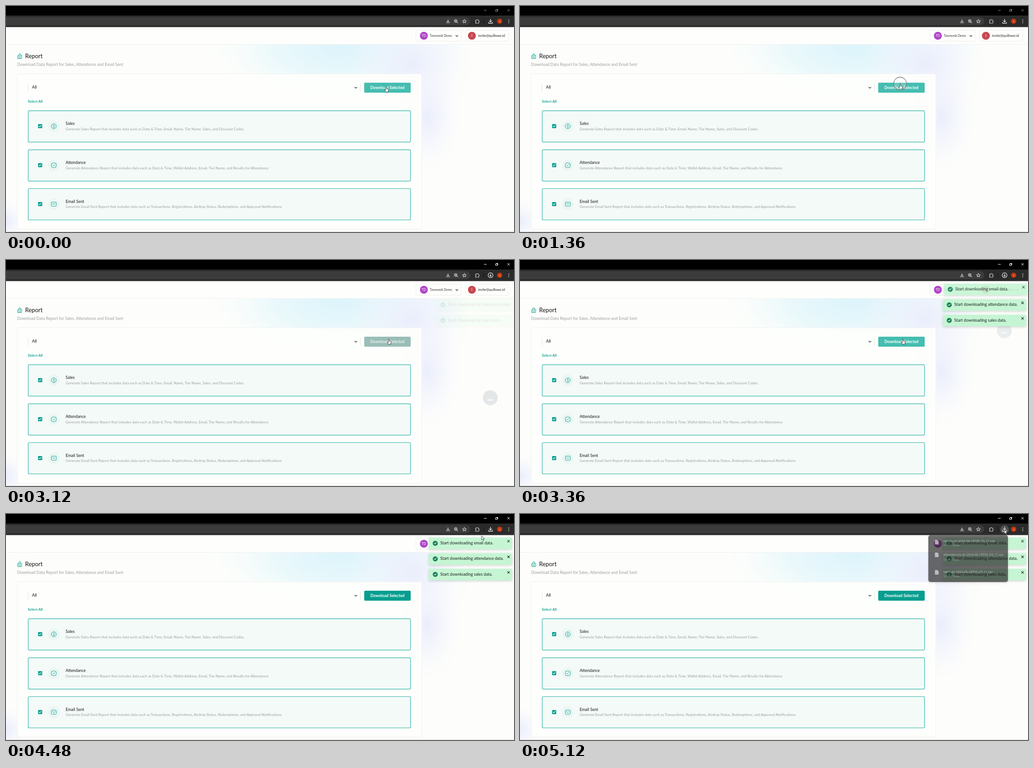
Recreate the animation shown at these times as an HTML page. Size 1116 by 498 pixels, loop 5200 ms.

```html
<!DOCTYPE html>
<html lang="en">
<head>
<meta charset="utf-8">
<title>Report download</title>
<style>
html, body { margin: 0; width: 100%; height: 100%; overflow: hidden; background: #fdfefb; }
svg { display: block; width: 1116px; height: 498px; font-family: Lato, "Open Sans", sans-serif; }
.line { fill: none; stroke-linecap: round; stroke-linejoin: round; }
.bar { stroke: #d2d2d2; stroke-width: 1.1; }
.teal { stroke: #12a394; stroke-width: 1; }
.muted { fill: #9b9da1; }
.mid { text-anchor: middle; }
.bold { font-weight: 700; }

.anim, .cursor, .cursor > * { animation: 5200ms linear infinite; }

.controls { animation-name: controls; }
@keyframes controls { 0%, 36.5% { opacity: .55; } 37.5%, 100% { opacity: 1; } }

.button { animation-name: button; }
@keyframes button {
  0%, 28% { fill: #45bdb0; }
  30%, 57.7% { fill: #8fcec7; }
  60% { fill: #9bbdb7; }
  62.5%, 75.5% { fill: #45bdb0; }
  80%, 100% { fill: #079e8f; }
}
.caption { animation-name: caption; }
@keyframes caption {
  0%, 28%, 62.5%, 100% { fill-opacity: 1; }
  30%, 60% { fill-opacity: .8; }
}

.cursor { animation-name: travel; }
@keyframes travel {
  0% { transform: translate(835px, 178px); }
  18%, 27% { transform: translate(835px, 171.5px); }
  40%, 50% { transform: translate(837px, 177px); }
  60%, 67% { transform: translate(841px, 174px); animation-timing-function: ease-in; }
  75.4% { transform: translate(890px, 158px); }
  87.5%, 100% { transform: translate(1064px, 34.5px); }
}
.cursor > .hand { animation-name: hand; animation-timing-function: step-end; }
.cursor > .ban { animation-name: ban; animation-timing-function: step-end; }
.cursor > .arrow { animation-name: arrow; animation-timing-function: step-end; }
@keyframes hand { 0% { opacity: 1; } 29.2% { opacity: 0; } 58.4% { opacity: 1; } 74.5%, 100% { opacity: 0; } }
@keyframes ban { 0% { opacity: 0; } 29.2% { opacity: 1; } 58.4%, 100% { opacity: 0; } }
@keyframes arrow { 0% { opacity: 0; } 74.5%, 100% { opacity: 1; } }

.ring { animation-name: ring; transform-origin: 835px 171px; }
@keyframes ring {
  0%, 23% { opacity: 0; transform: scale(.3); }
  26.1% { opacity: 1; transform: scale(1); }
  28.5%, 100% { opacity: 0; transform: scale(1.2); }
}

.tray { animation-name: tray; }
.progress { animation-name: progress; }
.badge { animation-name: badge; }
.hover { animation-name: hover; }
.tray, .progress, .badge { animation-timing-function: step-end !important; }
@keyframes tray { 0% { opacity: 1; } 57% { opacity: 0; } 86%, 100% { opacity: 1; } }
@keyframes progress { 0% { opacity: 0; } 57% { opacity: 1; } 86%, 100% { opacity: 0; } }
@keyframes badge { 0% { opacity: 0; } 67.7% { opacity: 1; } 86%, 100% { opacity: 0; } }
@keyframes hover { 0%, 87% { opacity: 0; } 89%, 100% { opacity: 1; } }

.fly { animation-name: fly; }
@keyframes fly {
  0%, 57% { opacity: 0; transform: translate(1064px, 400px); }
  60% { opacity: .9; transform: translate(1064px, 304px); }
  66% { opacity: .6; transform: translate(1064px, 112px); }
  68.4%, 100% { opacity: 0; transform: translate(1064px, 34px); }
}

.toast { animation-name: toast; }
.toast.late { animation-name: toastLate; }
@keyframes toast {
  0%, 59.2% { opacity: 0; transform: translateX(24px); }
  60% { opacity: .12; transform: translateX(17px); }
  63.5%, 100% { opacity: 1; transform: none; }
}
@keyframes toastLate {
  0%, 61% { opacity: 0; transform: translateX(24px); }
  65%, 100% { opacity: 1; transform: none; }
}

.popup { animation-name: popup; }
@keyframes popup { 0%, 89.2% { opacity: 0; } 91.5%, 100% { opacity: 1; } }
.files { font-family: "Open Sans", "Noto Sans", sans-serif; animation-name: files; }
@keyframes files { 0%, 92.4% { opacity: .9; } 98%, 100% { opacity: .62; } }
</style>
</head>
<body>
<svg viewBox="0 0 1116 498">
  <defs>
    <radialGradient id="cyan"><stop offset="0" stop-color="#dcf4fb"/><stop offset=".5" stop-color="#e6f7fb" stop-opacity=".85"/><stop offset="1" stop-color="#f2fbfb" stop-opacity="0"/></radialGradient>
    <radialGradient id="lilac"><stop offset="0" stop-color="#eaedfc"/><stop offset="1" stop-color="#f4f5fd" stop-opacity="0"/></radialGradient>
    <filter id="shadow" x="-10%" y="-30%" width="120%" height="180%"><feDropShadow dx="0" dy="2" stdDeviation="2.5" flood-color="#000" flood-opacity=".16"/></filter>
    <path id="chevron" class="line" d="M-2.3-1.2 0 1.2 2.3-1.2" stroke="#222" stroke-width="1.2"/>
    <path id="cross" class="line" d="M-2.2-2.2 2.2 2.2M2.2-2.2-2.2 2.2"/>
    <path id="tick" class="line" d="M-2.2 0-.7 1.6 2.3-1.6"/>
    <path id="page" fill="#f1f1f1" d="M-4-5H1.5L4-2.5V5H-4Z"/>
    <g id="row">
      <rect x="48.7" y=".7" width="840" height="69" rx="2.5" fill="#f4faf7" stroke="#4dbfb3" stroke-width="1.4"/>
      <rect x="70.5" y="30.3" width="9" height="9" rx="1" fill="#079e8f"/>
      <use href="#tick" x="75" y="34.8" stroke="#fff" stroke-width="1.2"/>
      <circle cx="105" cy="35" r="12.5" fill="#eaf6f3"/>
    </g>
  </defs>

  <!-- page -->
  <rect width="1116" height="498" fill="#fdfefb"/>
  <ellipse cx="735" cy="92" rx="285" ry="125" fill="url(#cyan)"/>
  <ellipse cx="890" cy="130" rx="135" ry="125" fill="url(#lilac)"/>
  <ellipse cx="925" cy="245" rx="75" ry="120" fill="url(#lilac)"/>
  <ellipse cx="0" cy="475" rx="50" ry="50" fill="url(#lilac)"/>
  <rect y="46" width="1116" height="38.5" fill="#fefffd"/>
  <path d="M0 84.5H1116" stroke="#eff0ee"/>
  <path d="M0 497.5H1116" stroke="#d9dbda"/>

  <!-- account chips -->
  <g fill="#fefffd" stroke="#ecedeb">
    <rect x="900.5" y="53.5" width="100" height="24" rx="3"/>
    <rect x="1009.5" y="53.5" width="94.500" height="24" rx="3"/>
  </g>
  <circle cx="918" cy="65.500" r="8.700" fill="#b044c8"/>
  <text class="mid" x="918" y="68.200" font-size="7.400" fill="#fff">TD</text>
  <text x="931" y="68" font-size="6.600" fill="#333">Tarunvesh Demo</text>
  <use href="#chevron" x="990.500" y="66"/>
  <circle cx="1023.500" cy="65.500" r="8.700" fill="#c94850"/>
  <text class="mid" x="1023.500" y="68.200" font-size="7.400" fill="#fff">I</text>
  <text x="1037" y="68" font-size="7.400" fill="#222">invite@quillowe.id</text>

  <!-- heading -->
  <path class="line teal" d="M25.500 115.500V109.500H28.500V105.500H31.500V115.500ZM28.500 115.500V109.500M31.500 108.500H34.500V115.500H31.500"/>
  <text x="42" y="114.600" font-size="12.900" fill="#151515">Report</text>
  <text class="muted" x="24.500" y="132.300" font-size="8.880">Download Data Report for Sales, Attendance and Email Sent</text>

  <!-- card -->
  <rect x="24.500" y="149.500" width="889" height="342" rx="4" fill="#fefffc" fill-opacity=".93" stroke="#eff1ef"/>
  <path d="M48.500 171V189M778.500 171V189" stroke="#e2e5e3"/>
  <text x="57" y="182.400" font-size="9.200" fill="#151515">All</text>
  <use href="#chevron" x="768.500" y="180"/>
  <rect class="anim button" x="787" y="169" width="102" height="22" rx="2" fill="#45bdb0"/>
  <text class="anim caption mid bold" x="838" y="182.500" font-size="8.700" fill="#fff">Download Selected</text>
  <text class="bold" x="48" y="213" font-size="7.900" fill="#16a093">Select All</text>

  <g transform="translate(0 230)">
    <use href="#row"/>
    <circle class="line teal" cx="105" cy="35" r="5.400"/>
    <text class="mid" x="105" y="37.900" font-size="8" fill="#12a394">$</text>
    <text x="131" y="32.200" font-size="8.900" fill="#151515">Sales</text>
    <text class="muted" x="131" y="44" font-size="7.840">Generate Sales Report that includes data such as Date &amp; Time, Email, Name, Tier Name, Sales, and Discount Codes.</text>
  </g>
  <g transform="translate(0 316)">
    <use href="#row"/>
    <path class="line teal" d="M105 29.300 107.200 30.300 109.600 30.600 110 33 111 35 110 37 109.600 39.400 107.200 39.700 105 40.700 102.800 39.700 100.400 39.400 100 37 99 35 100 33 100.400 30.600 102.800 30.300Z"/>
    <use href="#tick" class="teal" x="105" y="35"/>
    <text x="131" y="32" font-size="8.800" fill="#151515">Attendance</text>
    <text class="muted" x="131" y="43.700" font-size="7.840">Generate Attendance Report that includes data such as Date &amp; Time, Wallet Address, Email, Tier Name, and Results for Attendance</text>
  </g>
  <g transform="translate(0 401.700)">
    <use href="#row"/>
    <rect class="line teal" x="99.500" y="30.500" width="11" height="9" rx="2"/>
    <path class="line teal" d="M102 33.500 105 35.700 108 33.500"/>
    <text x="131" y="32" font-size="8.900" fill="#151515">Email Sent</text>
    <text class="muted" x="131" y="43.700" font-size="7.840">Generate Email Sent Report that includes data such as Transactions, Registrations, Airdrop Status, Redemptions, and Approval Notifications</text>
  </g>

  <!-- download marker rising to the toolbar -->
  <g class="anim fly">
    <circle r="16.500" fill="#e1e5e6"/>
    <path class="line" d="M-5 5H5" stroke="#f8faf9" stroke-width="3"/>
  </g>

  <!-- browser bar -->
  <rect width="1116" height="21.500" fill="#000"/>
  <rect y="21" width="1116" height="25.500" fill="#2b2b2b"/>
  <path d="M0 24.500H1011A9 9 0 0 1 1011 42.500H0Z" fill="#3c3c3c"/>
  <g class="anim controls line" stroke="#fff" stroke-width="1">
    <path d="M1050.500 9.500H1055.500M1077.500 8V7.500H1080.500V10.500H1080"/>
    <rect x="1076" y="8.300" width="3.700" height="3.700"/>
    <use href="#cross" x="1104" y="9.500"/>
  </g>
  <g class="line bar">
    <path d="M971 30V35M969 33.200 971 35.200 973 33.200M967.800 35.500V37H974.200V35.500"/>
    <circle cx="988" cy="33" r="2.900"/>
    <path d="M990.200 35.200 992.500 37.500M986.700 33H989.300M988 31.700V34.300"/>
    <path d="M1007 29.500 1008.300 32.200 1011.200 32.500 1009 34.400 1009.700 37.300 1007 35.800 1004.300 37.300 1005 34.400 1002.800 32.500 1005.700 32.200Z"/>
    <path d="M1031.500 31H1034A1.200 1.200 0 0 1 1036.400 31H1038.500V33.200A1.200 1.200 0 0 1 1038.500 35.600V38H1031.500V35.800A1.200 1.200 0 0 0 1031.500 33.200Z"/>
  </g>
  <path d="M1049.500 29V39" stroke="#111"/>
  <circle class="anim hover" cx="1064.500" cy="34" r="9.500" fill="#505050"/>
  <path class="anim tray line" d="M1064.500 29V35M1062 32.800 1064.500 35.300 1067 32.800M1060.300 35.800V38H1068.700V35.800" stroke="#e8e8e8" stroke-width="1.300"/>
  <g class="anim progress line" stroke="#e8e8e8" stroke-width="1.200">
    <circle cx="1064.500" cy="33.500" r="5.300"/>
    <path d="M1064.500 30.800V36M1062.500 34.200 1064.500 36.200 1066.500 34.200"/>
  </g>
  <g class="anim badge">
    <circle cx="1069" cy="38.500" r="2.800" fill="#2b2b2b"/>
    <text class="mid" x="1069" y="40.600" font-size="5.500" fill="#fff">3</text>
  </g>
  <circle cx="1084.500" cy="33.500" r="5.700" fill="#c8360c"/>
  <text class="mid" x="1084.500" y="36" font-size="6.500" fill="#fff">J</text>
  <g fill="#e0e0e0"><circle cx="1104.500" cy="30.500" r=".9"/><circle cx="1104.500" cy="33.700" r=".9"/><circle cx="1104.500" cy="36.900" r=".9"/></g>

  <g id="toasts"></g>

  <!-- downloads list -->
  <g class="anim popup">
    <rect x="897" y="46.500" width="175" height="103.500" rx="5" fill="#1f2120" fill-opacity=".62" filter="url(#shadow)"/>
    <g class="anim files" id="files"></g>
  </g>

  <circle class="anim ring" cx="835" cy="171" r="14" fill="#fff" fill-opacity=".22" stroke="#777b7b" stroke-width="1.300"/>
  <g class="cursor">
    <path class="hand" d="M-.9.8A1 1 0 0 1 1.100.8V4.500L4.300 5.200Q5.400 5.500 5.200 6.700L4.300 11.500H-.8L-3.300 7.500Q-3.300 6.300-2 6.800L-.9 7.800Z" fill="#fff" stroke="#222" stroke-width=".8" stroke-linejoin="round"/>
    <g class="ban" stroke="#a5222a" stroke-width="1.500"><circle r="3.900" fill="#fff" fill-opacity=".5"/><path d="M-2.700-2.700 2.700 2.700"/></g>
    <path class="arrow" d="M0 0V9L2.100 7.200 3.500 10.200 4.900 9.500 3.600 6.600H6.300Z" fill="#fff" stroke="#222" stroke-width=".8" stroke-linejoin="round"/>
  </g>
</svg>
<script>
const fill = (id, items, draw) => {
  document.getElementById(id).innerHTML = items.map(draw).join("");
};

fill("toasts", ["email", "attendance", "sales"], (name, i) => `
  <g transform="translate(0 ${52 + i * 34.3})"><g class="anim toast ${i ? "" : "late"}">
    <rect x="928.500" width="183.500" height="25.500" rx="3" fill="#c6f5d4" filter="url(#shadow)"/>
    <circle cx="943" cy="12.500" r="5.500" fill="#17805a"/>
    <use href="#tick" x="943" y="12.500" stroke="#fff" stroke-width="1.100"/>
    <text x="954" y="15" font-size="8.980" fill="#17211b">Start downloading ${name} data.</text>
    <use href="#cross" x="1104" y="8" stroke="#222" stroke-width="1.100"/>
  </g></g>`);

const files = [["emails", "4.7", 62], ["attendances", "3.5", 91.5], ["sales", "3.0", 130]];
fill("files", files, ([name, size, y], i) => `
  <use href="#page" x="915.500" y="${i ? y - 1.5 : y}"/>
  <text x="930" y="${y}" font-size="6.850" fill="#fff">${name}-all-2024-06-18T05_03_11.csv</text>
  <text x="930" y="${y + (i === 1 ? 11.5 : 9)}" font-size="5.600" fill="#d6d6d6">${size} KB • Done</text>`);
</script>
</body>
</html>
```
